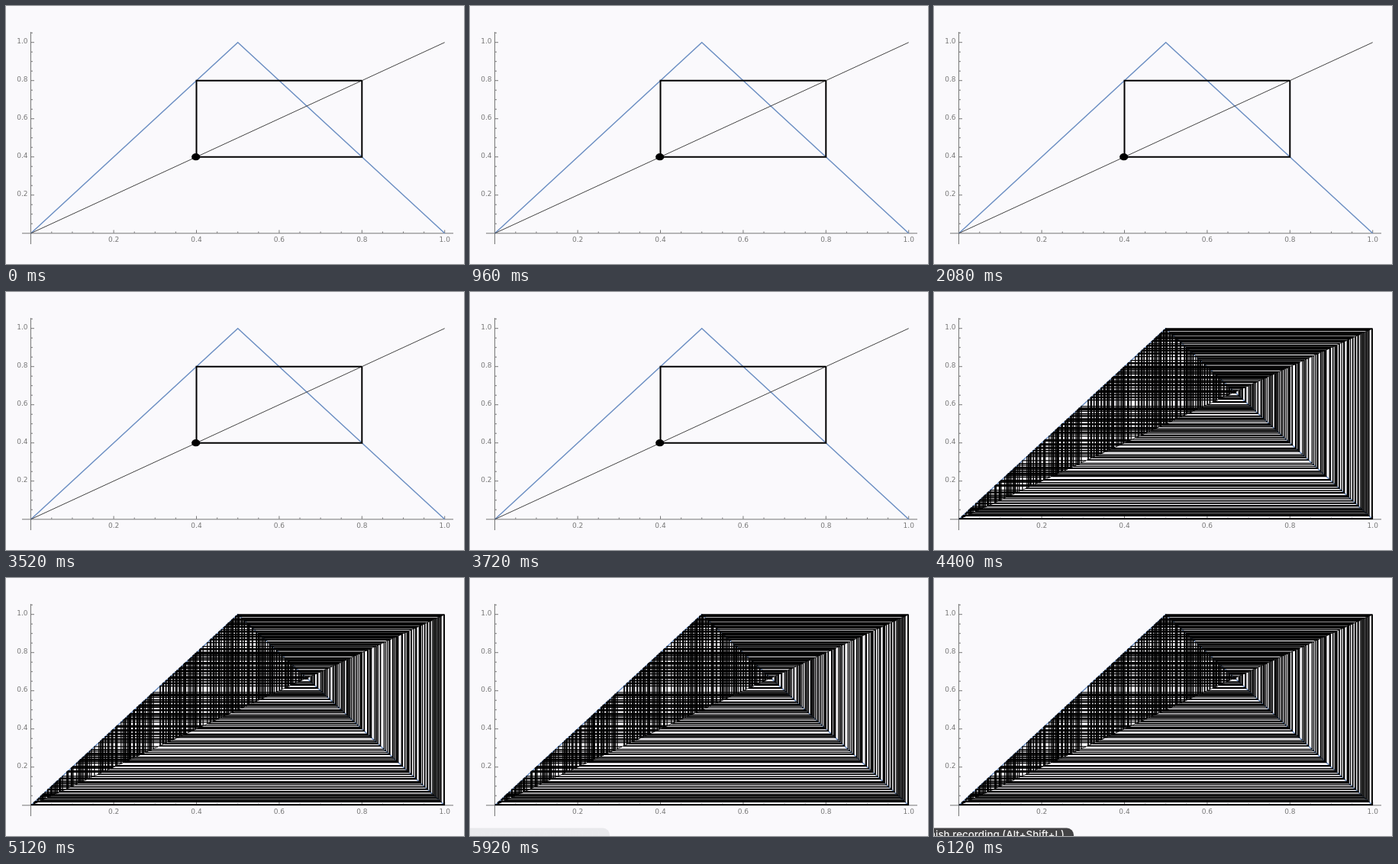
Recreate the animation shown at these times as an HTML page with a canvas. Size 600 by 338 pixels, loop 6160 ms.

```html
<!DOCTYPE html>
<html lang="en">
<head>
<meta charset="utf-8">
<title>Tent map cobweb</title>
<style>
  html, body { margin: 0; width: 100%; height: 100%; overflow: hidden; background: #faf9fc; }
  canvas { display: block; }
</style>
</head>
<body>
<canvas id="stage" width="600" height="338"></canvas>
<script>
const ctx = document.getElementById('stage').getContext('2d');
const LOOP = 6160, WEB_START = 3880, TOAST_START = 5870;
const px = x => 32.7 + 542 * x;
const py = y => 297.7 - 250 * y;
const tent = x => x < 0.5 ? 2 * x : 2 - 2 * x;

function path(points, color, width) {
  ctx.beginPath();
  for (const [x, y] of points) ctx.lineTo(px(x), py(y));
  ctx.strokeStyle = color;
  ctx.lineWidth = width;
  ctx.stroke();
}

// One cobweb step: diagonal to curve, then back to the diagonal.
function step(x, width) {
  const y = tent(x);
  path([[x, x], [x, y], [y, y]], '#000', width);
}

// Evenly spread visits with seeded jitter; gaps persist through one preimage.
function makeVisits(count) {
  const gaps = [[0.302, 0.005], [0.422, 0.0035], [0.214, 0.0035], [0.158, 0.003]];
  const inGap = x => gaps.some(([center, half]) => Math.abs(x - center) < half);
  const visits = [0.0008, 0.4996, 0.9992];
  let seed = 71;
  for (let i = 1; i < count; i++) {
    seed = (seed * 1664525 + 1013904223) % 4294967296;
    const jitter = (seed / 4294967296 - 0.5) * 2.2;
    const x = Math.min(0.999, Math.max(0.001, (i + jitter) / count));
    if (!inGap(x) && !inGap(tent(x))) visits.push(x);
  }
  return visits;
}
const visits = makeVisits(345);

function drawAxes() {
  ctx.fillStyle = '#777';
  ctx.fillRect(21, 297.3, 565, 1);
  ctx.fillRect(32, 34, 1, 278);
  ctx.font = '9px "DejaVu Sans", sans-serif';
  for (let i = 1; i <= 21; i++) {
    const v = i / 20, major = i % 4 === 0, size = major ? 4 : 2;
    if (i <= 20) ctx.fillRect(px(v) - 0.5, 297.5 - size, 1, size);
    ctx.fillRect(33, py(v) - 0.5, size, 1);
    if (!major) continue;
    ctx.textAlign = 'center';
    ctx.fillText(v.toFixed(1), px(v), 308.5);
    ctx.textAlign = 'right';
    ctx.fillText(v.toFixed(1), 28.5, py(v) + 1.5);
  }
}

function drawCycle() {
  step(0.4, 2);
  step(0.8, 2);
  ctx.fillStyle = '#000';
  ctx.beginPath();
  ctx.ellipse(px(0.4) - 0.8, py(0.4), 5.6, 4.6, 0, 0, 2 * Math.PI);
  ctx.fill();
}

function drawToast(t) {
  const p = Math.min(1, Math.max(0, (t - TOAST_START) / (LOOP - TOAST_START)));
  if (!p) return;
  ctx.globalAlpha = p * p * (3 - 2 * p);
  ctx.fillStyle = '#39393c';
  ctx.beginPath();
  ctx.roundRect(-60, 327.5, 243, 28, 9);
  ctx.fill();
  ctx.fillStyle = '#fff';
  ctx.font = '500 13.4px Inter, sans-serif';
  ctx.textAlign = 'right';
  ctx.fillText('Finish recording (Alt+Shift+L)', 171, 341);
  ctx.globalAlpha = 1;
}

function frame() {
  const t = performance.now() % LOOP;
  ctx.fillStyle = '#faf9fc';
  ctx.fillRect(0, 0, 600, 338);
  drawAxes();
  path([[0, 0], [0.5, 1], [1, 0]], '#6c8fc3', 1.5);
  path([[0, 0], [1, 1]], '#444', 1);
  if (t < WEB_START) drawCycle();
  else visits.forEach(x => step(x, 1.3));
  drawToast(t);
  requestAnimationFrame(frame);
}
frame();
</script>
</body>
</html>
```
